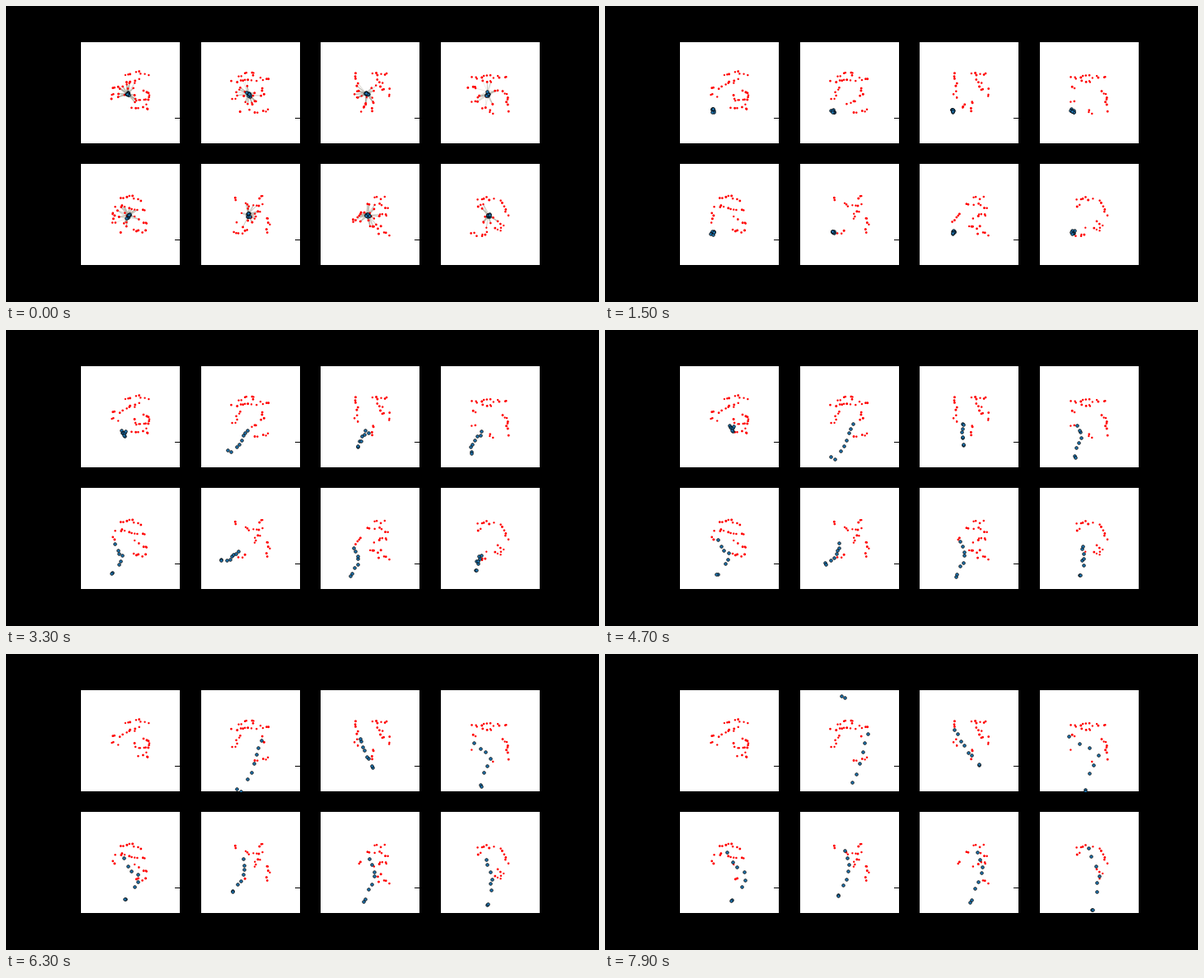
Animation of 720 by 360 pixels, one loop 8000 ms. Source, as a matplotlib script:

```python
import numpy as np
import matplotlib.pyplot as plt
from matplotlib.animation import FuncAnimation
from matplotlib.collections import LineCollection
from matplotlib.patches import Rectangle

W, H, DPI = 720, 360, 100
FRAMES, STEP = 80, 100
PW, PH = 120, 123
TIMES = np.arange(FRAMES) * STEP
AGENTS, CORE = 8, 10
EAT = 3.0
START, NOOK = np.array([57.5, 63]), np.array([40, 83])

fig = plt.figure(figsize=(W / DPI, H / DPI), dpi=DPI, facecolor="black")
ax = fig.add_axes([0, 0, 1, 1])
ax.set(xlim=(0, W), ylim=(H, 0))
ax.axis("off")


def along(points, u):
    """Points at the shares u (0 to 1) of a polyline's length."""
    p = np.array(points, float)
    s = np.r_[0, np.cumsum(np.hypot(*np.diff(p, axis=0).T))]
    return np.column_stack([np.interp(u * s[-1], s, p[:, k]) for k in (0, 1)])


def strew(points, rng, gap=4.2):
    """Loosely spaced dots along a polyline."""
    length = np.hypot(*np.diff(np.array(points), axis=0).T).sum()
    n = int(length / gap) + 1
    u = (np.arange(n) + rng.uniform(0.2, 0.8, n)) / n
    return along(points, u) + rng.uniform(-2, 2, (n, 2))


def block(x, y, w, h, color):
    return ax.add_patch(Rectangle((x, y), w, h, fc=color, lw=0,
                                  antialiased=False))


class Panel:
    """A swarm that rushes to a corner, then drifts through food as a train."""

    def __init__(self, index, strands, early, late, gone=np.inf):
        row, col = divmod(index, 4)
        self.rng = np.random.default_rng(index + 5)
        self.pos = np.array([round(90.9 + 145.7 * col), 44 + 148 * row])
        self.gone = gone
        self.plan_swarm(early, late)
        self.plan_food(strands)
        self.build(col)

    def plan_swarm(self, early, late):
        rng = self.rng
        u = np.linspace(0, 1, AGENTS) ** 1.1
        u[1] = u[0]
        loose = rng.normal(0, 1.3, (AGENTS, 2))
        stops = np.array([START + rng.normal(0, 1.4, (AGENTS, 2)),
                          NOOK + loose, NOOK + loose,
                          along(early, u) + loose, along(late, u) + loose])
        keys = [0, 1000, 1500, 3300, 7900]
        self.swarm = np.array([[[np.interp(t, keys, stops[:, i, k])
                                 for k in (0, 1)] for i in range(AGENTS)]
                               for t in TIMES])
        self.swarm[..., 1] %= PH
        self.swarm += self.pos

    def plan_food(self, strands):
        rng = self.rng
        core = START + (-3, 3) + rng.normal(0, 9, (CORE, 2))
        self.food = np.concatenate([strew(s, rng) for s in strands] + [core])
        self.food += self.pos + 0.5
        dist = np.linalg.norm(self.swarm[:, :, None] - self.food, axis=3)
        hit = dist.min(1) < EAT
        hit[(TIMES == 0) | (TIMES >= self.gone)] = False
        self.end = np.where(hit.any(0), hit.argmax(0), FRAMES)
        self.end[-CORE:] = rng.integers(2, 13, CORE)
        self.size = rng.uniform(2.6, 4.8, len(self.food))

    def build(self, col):
        x, y = self.pos
        box = block(x, y, PW, PH, "white")
        if col < 3:
            block(x + PW - 6, y + 92, 6, 1, "black")
        self.links = LineCollection([], colors="#aaa69a", linewidths=0.5,
                                    alpha=0.3, zorder=2)
        ax.add_collection(self.links)
        self.reds = ax.scatter([], [], c="red", linewidths=0, zorder=3)
        self.blues = ax.scatter([], [], s=6.5, c="#1f77b4", linewidths=0.5,
                                edgecolors="black", zorder=4)
        for art in (self.links, self.blues):
            art.set_clip_path(box)

    def draw(self, i):
        live = self.end > i
        food = self.food[live]
        swarm = self.swarm[i] if TIMES[i] < self.gone else self.swarm[i, :0]
        reach = max(15 - 0.5 * i, 6)
        dist = np.linalg.norm(swarm[:, None] - food, axis=2)
        self.links.set_segments([(swarm[a], food[b])
                                 for a, b in np.argwhere(dist < reach)])
        self.reds.set_offsets(food)
        self.reds.set_sizes(self.size[live])
        self.blues.set_offsets(swarm)


# Each panel: food strands, then the train (tail, middle, head) early and late.
panels = [
    Panel(0, [[(51, 40), (67, 36), (83, 38)], [(36, 56), (49, 54), (72, 44)],
              [(36, 63), (47, 67)], [(62, 62), (68, 72), (82, 70)],
              [(74, 57), (83, 60), (80, 80)], [(60, 79), (80, 80)]],
          [(50, 80), (52, 83), (54, 81)], [(87, 60), (88, 63), (90, 62)],
          gone=5100),
    Panel(1, [[(36, 47), (55, 45), (83, 44)], [(43, 40), (63, 37), (65, 42)],
              [(46, 52), (38, 72)], [(74, 53), (75, 60), (72, 66)],
              [(54, 76), (68, 72)], [(63, 84), (83, 82)]],
          [(35, 102), (46, 93), (57, 76)], [(53, 130), (70, 94), (83, 51)]),
    Panel(2, [[(41, 37), (43, 50), (42, 63), (45, 70)], [(61, 38), (83, 38)],
              [(67, 45), (76, 49)], [(68, 55), (82, 58), (83, 67)],
              [(64, 69), (62, 84)], [(50, 80), (55, 73)]],
          [(45, 98), (54, 79), (58, 80)], [(72, 91), (50, 62), (42, 47)]),
    Panel(3, [[(35, 44), (46, 42), (61, 41), (82, 42)], [(36, 55), (44, 55)],
              [(48, 48), (64, 48)], [(72, 56), (81, 66), (81, 84)],
              [(55, 83), (66, 85)], [(35, 73), (44, 70)]],
          [(39, 106), (40, 88), (50, 78)], [(57, 123), (70, 78), (36, 55)]),
    Panel(4, [[(44, 41), (67, 40), (74, 46)], [(36, 58), (40, 62), (36, 72)],
              [(41, 53), (53, 51), (62, 55), (78, 54)], [(64, 63), (69, 67)],
              [(73, 72), (82, 73)], [(63, 80), (80, 82)]],
          [(39, 103), (52, 81), (40, 68)], [(64, 107), (82, 77), (56, 49)]),
    Panel(5, [[(41, 37), (41, 45)], [(68, 41), (72, 37), (77, 40)],
              [(52, 46), (58, 52), (76, 50)], [(73, 55), (64, 63), (65, 70)],
              [(81, 62), (82, 72), (77, 83)], [(36, 83), (54, 82)]],
          [(25, 88), (30, 88), (46, 78)], [(47, 102), (60, 66), (55, 48)]),
    Panel(6, [[(65, 41), (79, 41)], [(55, 50), (70, 49), (83, 54)],
              [(50, 58), (39, 68), (42, 71)], [(64, 68), (76, 59), (81, 67)],
              [(57, 76), (76, 77)], [(70, 83), (83, 86)]],
          [(36, 105), (45, 92), (40, 72)], [(61, 108), (75, 74), (70, 48)]),
    Panel(7, [[(41, 45), (55, 40), (64, 44)], [(70, 45), (78, 50), (81, 62)],
              [(44, 50), (51, 49)], [(66, 69), (77, 74)],
              [(75, 80), (62, 77)], [(36, 85), (53, 86), (55, 78)]],
          [(42, 99), (45, 88), (50, 80)], [(63, 118), (72, 77), (60, 42)]),
]


def update(i):
    for p in panels:
        p.draw(i)


anim = FuncAnimation(fig, update, frames=FRAMES, interval=STEP,
                     repeat=True, repeat_delay=0)
plt.show()
```
